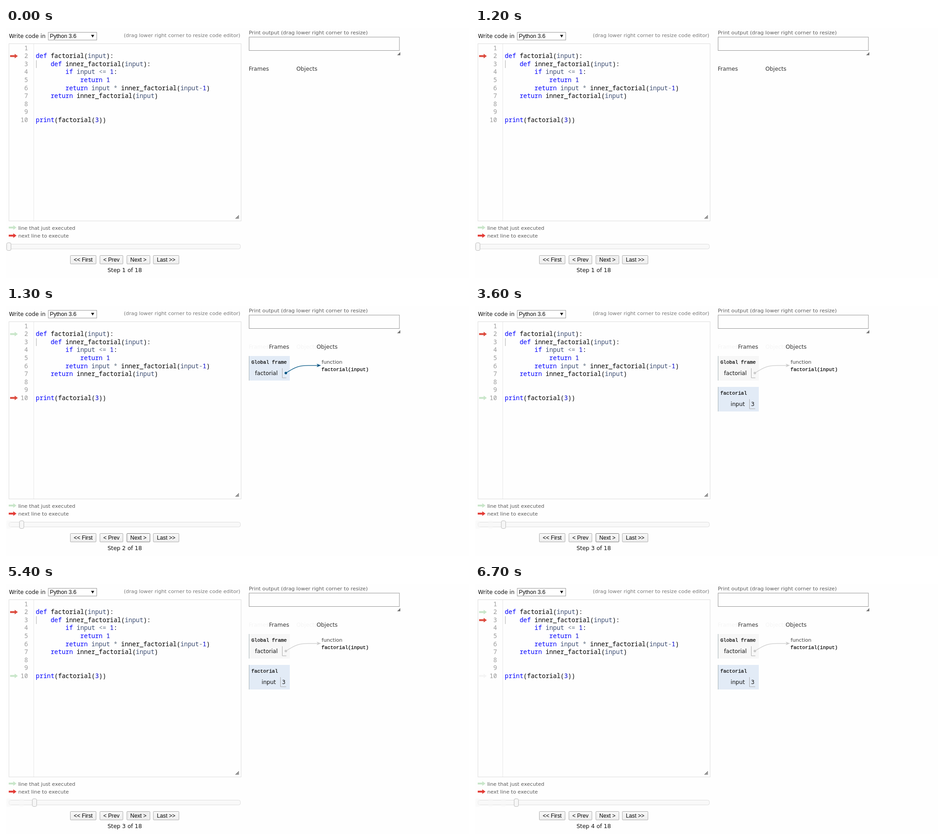
Animation of 1018 by 550 pixels, one loop 8 s. Source, as an HTML page:

```html
<!DOCTYPE html>
<html lang="en">
<head>
<meta charset="utf-8">
<title>Code stepper</title>
<style>
  html, body { margin: 0; width: 100%; height: 100%; overflow: hidden; background: #fefefe; }
  svg { display: block; width: 1018px; height: 550px; }
  text { font: 12.2px "DejaVu Sans", sans-serif; white-space: pre; fill: #111; }
  .small { font-size: 11.2px; fill: #5c5c5c; }
  .hint { font-size: 11.2px; fill: #787878; }
  .output { font-size: 11.3px; fill: #5c5c5c; }
  .type { font-size: 11.2px; fill: #444; }
  .step { font-size: 12.4px; text-anchor: middle; }
  .ui { font: 12.2px "Liberation Sans", sans-serif; fill: #000; }
  .button { text-anchor: middle; }
  .code { font: 13.58px "Noto Sans Mono", monospace; fill: #000; }
  .number { fill: #999; text-anchor: end; }
  .mono { font: 10.8px "Liberation Mono", monospace; fill: #000; stroke: #000; stroke-width: .25; }
  .heading { fill: #333; }
  .ghost { fill: #f5f5f5; }
  .keyword { fill: #00f; }
  .builtin { fill: #3c4c72; }
  .digit { fill: #0000cd; }
  .operator { fill: #687687; }
  .line { fill: none; stroke: #aaa; }
</style>
</head>
<body>
<svg id="stage" viewBox="0 0 1018 550"></svg>
<script>
const RED = '#dc4b3e', GREEN = '#c9e6ca', FAINT = '#f5f5f5';
const LOOP = 8000;

const SOURCE = `
def factorial(input):
    def inner_factorial(input):
        if input <= 1:
            return 1
        return input * inner_factorial(input-1)
    return inner_factorial(input)


print(factorial(3))`.split('\n');

const TOKEN_STYLES = [
  ['keyword', /^(def|if|return|print)$/],
  ['builtin', /^input$/],
  ['digit', /^\d+$/],
  ['operator', /^[<=*-]+$/],
];

// Each step: start time, line to run next, line just run.
const STEPS = [
  { at: 0, next: 2 },
  { at: 1300, next: 10, last: 2 },
  { at: 3600, next: 2, last: 10 },
  { at: 5500, next: 3, last: 2, faded: 10 },
];

// Pointer state of the buttons over time.
const POINTER = [
  { at: 0 },
  { at: 500, button: 'Prev', look: 'hover' },
  { at: 700, button: 'Next', look: 'hover' },
  { at: 1200, button: 'Next', look: 'pressed' },
  { at: 1300, button: 'Next', look: 'hover' },
  { at: 3400, button: 'Next', look: 'pressed' },
  { at: 3600, button: 'Next', look: 'hover' },
  { at: 5400, button: 'Next', look: 'pressed' },
  { at: 5500, button: 'Next', look: 'hover' },
  { at: 6700 },
];

const lineY = n => 48.8 + 17.56 * (n - 1);
const knobX = step => 6 + 28.2 * step;
const escapeText = s => s.replace(/&/g, '&amp;').replace(/</g, '&lt;').replace(/>/g, '&gt;');
const markup = (x, y, content, cls) => `<text x="${x}" y="${y}" class="${cls}">${content}</text>`;
const text = (x, y, content, cls = '') => markup(x, y, escapeText(content), cls);
const rect = (x, y, w, h, fill, stroke = 'none', r = 0) =>
  `<rect x="${x}" y="${y}" width="${w}" height="${h}" rx="${r}" fill="${fill}" stroke="${stroke}"/>`;
const path = (d, attrs) => `<path d="${d}" ${attrs}/>`;
const arrow = (x, y, fill) =>
  path(`M${x} ${y - 2}h10v-3l7 5l-7 5v-3h-10z`, `fill="${fill}"`);
const gutterArrow = (line, fill) => line ? arrow(9, lineY(line) - 4.5, fill) : '';

const highlight = line => line.replace(/\w+|[<=*-]+|[^\w\s]/g, word => {
  const style = TOKEN_STYLES.find(([, pattern]) => pattern.test(word));
  return style ? `<tspan class="${style[0]}">${escapeText(word)}</tspan>` : escapeText(word);
});

function editor() {
  const rows = SOURCE.map((line, i) =>
    text(48.3, lineY(i + 1), String(i + 1), 'code number') +
    markup(65.6, lineY(i + 1), highlight(line), 'code'));
  return text(6.5, 22, 'Write code in') +
    rect(93, 9.5, 106.5, 17, '#fff', '#999') +
    text(96.5, 22, 'Python 3.6', 'ui') +
    path('M187 15h7l-3.5 6z', 'fill="#111"') +
    text(259, 20, '(drag lower right corner to resize code editor)', 'hint') +
    rect(6.5, 34.5, 510.5, 390, '#fefefe', '#ddd') +
    path('M61 35v389', 'stroke="#e6e6e6"') +
    rows.join('') +
    path('M66.8 71v17', 'class="line"') +
    path('M505 419.5l7-7M508 419.5l4-4M511 419.5l1-1', 'stroke="#444" stroke-width="1.2"') +
    arrow(6, 439, GREEN) + text(27, 443.5, 'line that just executed', 'small') +
    arrow(6, 456.7, '#e33b35') + text(27, 461, 'next line to execute', 'small');
}

function button(x, width, label, look) {
  const fill = look === 'pressed' ? '#eee' : 'url(#face)';
  const edge = look === 'hover' ? '#777' : '#aaa';
  return rect(x, 500.5, width, 18.5, fill, edge, 1) +
    text(x + width / 2, 514, label, 'ui button');
}

function controls(step, pointer) {
  const look = name => pointer.button === name ? pointer.look : '';
  let out = rect(6.5, 475.5, 509, 10.5, '#f9f9f9', '#ddd', 4);
  for (let i = 0; i < step; i++)
    out += rect(knobX(i) - 5, 472, 10, 18, '#f6f6f699', 'none', 3);
  return out +
    rect(knobX(step) - 4.5, 472.5, 9.5, 17, '#f7f7f7', '#bbb', 3) +
    button(141.5, 56.5, '<< First') +
    button(206.5, 50.5, '< Prev', look('Prev')) +
    button(265.8, 50.7, 'Next >', look('Next')) +
    button(324, 56.2, 'Last >>') +
    text(261, 537, `Step ${step + 1} of 18`, 'step');
}

const frameBox = (y, title, active) =>
  rect(534, y, 90, 54, active ? '#e2ebf6' : '#f7f7f7') +
  path(`M534.5 ${y}v54`, 'stroke="#a6b3b6"') +
  text(539.5, y + 17, title, 'mono');

function visualizer(step) {
  let out = text(534, 14, 'Print output (drag lower right corner to resize)', 'output') +
    rect(534.5, 20, 330.5, 29.5, '#fefefe', '#949494') +
    path('M867 53v7h-7z', 'fill="#777"');
  const headings = (dx, cls) =>
    text(533.7 + dx, 94, 'Frames', cls) + text(638.5 + dx, 94, 'Objects', cls);
  if (step === 0) return out + headings(0, 'heading');

  const ink = step === 1 ? '#005583' : '#ccc';
  out += headings(0, 'ghost') + headings(44.5, 'heading') +
    frameBox(110, 'Global frame', step === 1) +
    text(547.5, 151.7, 'factorial') +
    path('M607.5 137v21h9', 'class="line"') +
    `<circle cx="615.3" cy="147.5" r="2.8" fill="${ink}"/>` +
    path('M615.3 147.5C636 134 645 130.8 665 130.8H686', `fill="none" stroke="${ink}" stroke-width="1.2"`) +
    path('M692.5 130.8l-9.5-3.8l2.6 3.8l-2.6 3.8z', `fill="${ink}"`) +
    text(694, 127, 'function', 'type') +
    text(693.7, 142.5, 'factorial(input)', 'mono');
  if (step > 1)
    out += frameBox(178, 'factorial', true) +
      text(562, 219.7, 'input') +
      path('M603.5 205v21h12.5', 'class="line"') +
      text(606.8, 219.7, '3');
  return out;
}

const stage = document.getElementById('stage');
stage.innerHTML = `<linearGradient id="face" x2="0" y2="1">
  <stop stop-color="#f8f8f8"/><stop offset="1" stop-color="#eee"/></linearGradient>` +
  editor() + '<g id="live"></g>';
const live = document.getElementById('live');
let shown = '';

function draw(now) {
  const t = now % LOOP;
  const current = list => list.findLastIndex(entry => entry.at <= t);
  const step = current(STEPS), phase = current(POINTER);
  const key = step + ':' + phase;
  if (key !== shown) {
    shown = key;
    const { next, last, faded } = STEPS[step];
    live.innerHTML = gutterArrow(faded, FAINT) + gutterArrow(last, GREEN) + gutterArrow(next, RED) +
      controls(step, POINTER[phase]) + visualizer(step);
  }
  requestAnimationFrame(draw);
}
draw(performance.now());
</script>
</body>
</html>
```
